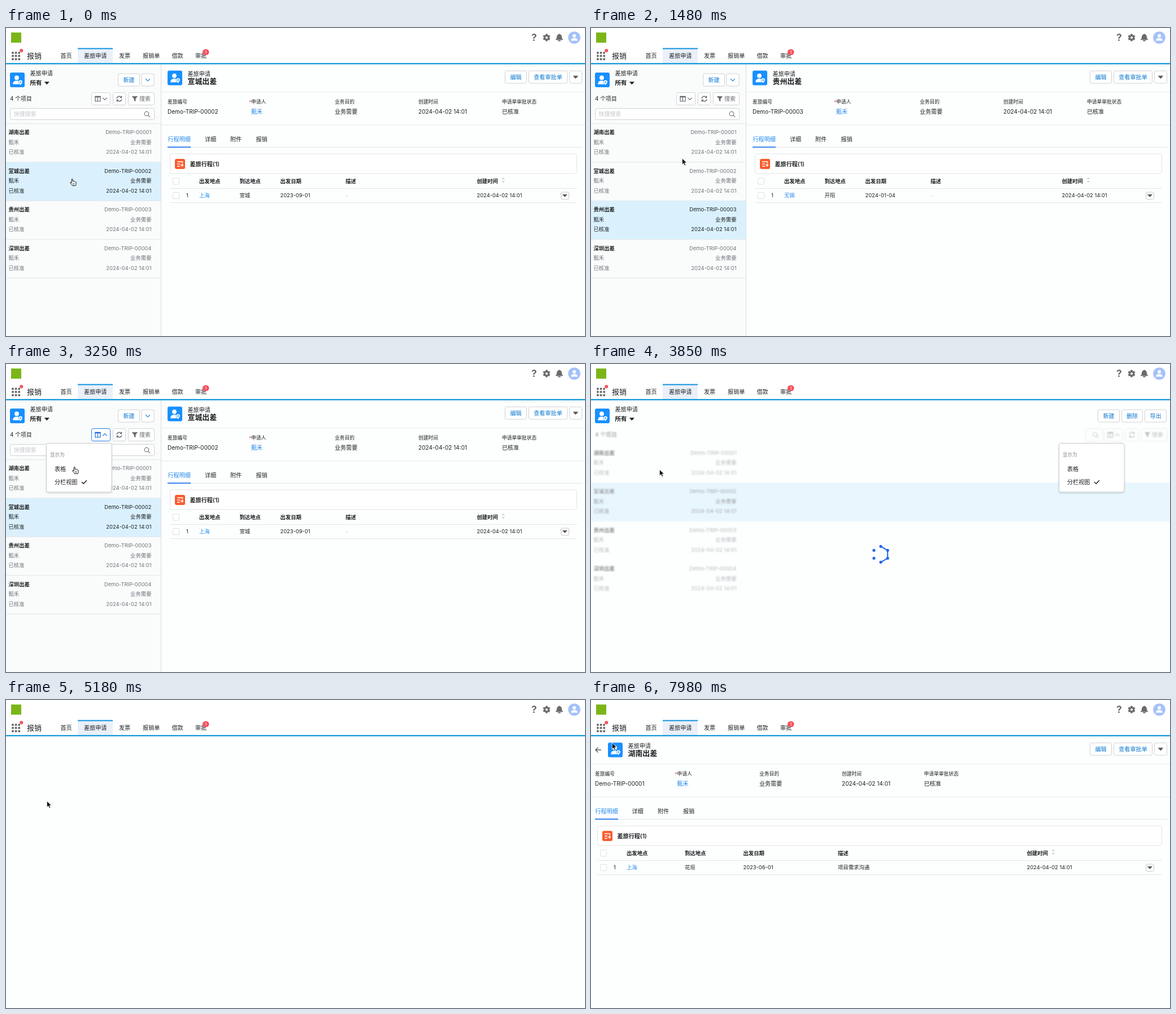
An HTML page for the animation above (8 s loop, 1025x546 px).

```html
<!DOCTYPE html>
<html lang="zh-CN">
<head>
<meta charset="utf-8">
<style>
html, body { margin: 0; width: 100%; height: 100%; overflow: hidden; background: #fdfefe; }
svg { display: block; width: 1025px; height: 546px; }
text { font-family: Inter, "Noto Sans CJK SC", "Noto Sans CJK", sans-serif; white-space: pre; }
</style>
</head>
<body>
<svg viewBox="0 0 1025 546" xmlns="http://www.w3.org/2000/svg">
  <defs>
    <filter id="soft" x="-5%" y="-5%" width="110%" height="110%"><feGaussianBlur stdDeviation="0.9"/></filter>
    <filter id="shade" x="-10%" y="-10%" width="120%" height="125%"><feDropShadow dx="0" dy="1.5" stdDeviation="1.5" flood-opacity=".16"/></filter>
  </defs>
  <g id="stage"></g><g id="top"></g><g id="cursor"></g>
</svg>
<script>
const INK = '#1d1f22', GREY = '#70747b', BLUE = '#0b78d0', LINK = '#2388ee', LINE = '#e3e4e6';
const PERSON = '甄禾', PURPOSE = '业务需要', STAMP = '2024-04-02 14:01', STATE = '已核准';
const TRIPS = [
  ['湖南出差', '上海', '花垣', '2023-06-01', '项目需求沟通'],
  ['宣城出差', '上海', '宣城', '2023-09-01', '-'],
  ['贵州出差', '无锡', '开阳', '2024-01-04', '-'],
  ['深圳出差', '上海', '深圳', '2024-02-01', '-']
].map(([name, from, to, date, note], i) => ({ name, from, to, date, note, no: 'Demo-TRIP-0000' + (i + 1) }));

// y is the optical middle of the text
function text(x, y, s, size = 10, fill = INK, weight = 400, anchor = 'start') {
  return `<text x="${x}" y="${y + size * 0.37}" font-size="${size}" fill="${fill}" font-weight="${weight}" text-anchor="${anchor}">${s}</text>`;
}
const bold = (x, y, s, size, fill) => text(x, y, s, size, fill, 600);
const rect = (x, y, w, h, fill, extra = '') => `<rect x="${x}" y="${y}" width="${w}" height="${h}" fill="${fill}" ${extra}/>`;
const frame = (x, y, w, h, stroke = '#cfd2d6', r = 3) => rect(x + .5, y + .5, w - 1, h - 1, '#fff', `rx="${r}" stroke="${stroke}"`);
const path = (d, stroke, width = 1.2, fill = 'none') =>
  `<path d="${d}" fill="${fill}" stroke="${stroke}" stroke-width="${width}" stroke-linecap="round" stroke-linejoin="round"/>`;
const circle = (x, y, r, fill) => `<circle cx="${x}" cy="${y}" r="${r}" fill="${fill}"/>`;
const hline = (x1, x2, y, c = LINE) => rect(x1, y, x2 - x1, 1, c);
const move = (x, y, s) => `<g transform="translate(${x} ${y})">${s}</g>`;
const chevron = (x, y, c, up = 1) => path(`M${x - 3.5} ${y - 1.7 * up}l3.5 ${3.5 * up} 3.5 ${-3.5 * up}`, c, 1.1);
const triangle = (x, y, w, c) => path(`M${x - w} ${y - w / 2}h${2 * w}l${-w} ${w * 1.1}z`, c, .8, c);
const button = (x, y, w, s) => frame(x, y, w, 23) + text(x + w / 2, y + 11.5, s, 10.1, BLUE, 400, 'middle');
const lens = (x, y, c) => path(`M${x + 2.4} ${y + 2.4}l2.8 2.8M${x + 3.2} ${y - .5}a3.8 3.8 0 1 1-7.6 0a3.8 3.8 0 1 1 7.6 0`, c, 1.1);

function tripIcon(x, y) {
  return move(x, y, rect(0, 0, 26, 26, '#1890ff', 'rx="3"') + circle(12, 9.2, 3.9, '#fff') +
    path('M5.5 20.2q0-5.6 6.5-5.6q2 0 3 .8l-.6 2 1.8 2.8z', '#fff', .6, '#fff') +
    path('M18.6 21.5q-3-3-3-4.8a3 3 0 0 1 6 0q0 1.800-3 4.800z', '#fff', .6, '#fff') + circle(18.6, 16.7, 1.2, '#1890ff'));
}

function layoutButton(x, y, active, up) {
  const c = active ? '#1769d8' : '#60656b';
  return frame(x, y, 34, 23, active ? '#2878e8' : '#cfd2d6') +
    path(`M${x + 7} ${y + 7.500}h9v8.500h-9zM${x + 11.500} ${y + 8}v8`, c, 1.2) +
    rect(x + 6.4, y + 6.6, 10.200, 2.3, c) + chevron(x + 24, y + 11.5, c, up ? -1 : 1);
}

function refreshButton(x, y) {
  return frame(x, y, 23, 23) + move(x + 11.5, y + 11.5,
    path('M-4.300-1a4.400 4.400 0 0 1 8-1.400M4.300 1a4.400 4.400 0 0 1-8 1.400M4.200-4.600v2.400h-2.400M-4.200 4.600v-2.400h2.400', '#60656b', 1.3));
}

function filterButton(x, y) {
  return frame(x, y, 47, 23) + move(x + 12, y + 11.5,
    path('M-4.500-4.200h9l-3.500 4.200v4.200l-2-1.200v-3z', '#666', .8, '#666')) + text(x + 20, y + 11.5, '搜索', 10, '#666b72');
}

function heading() {
  return tripIcon(7, 79) + text(42.5, 80.5, '差旅申请', 10.1) + bold(42.5, 97.5, '所有', 10.500) + triangle(72.5, 97.5, 3.600, INK);
}

const logo = () => rect(9, 8, 18, 18, '#7cb518');

function gear() {
  const teeth = [0, 60, 120].map(a => rect(-1.9, -6.500, 3.8, 13, '#6b6b6b', `rx=".8" transform="rotate(${a})"`)).join('');
  return move(957, 17, teeth + circle(0, 0, 4.8, '#6b6b6b') + circle(0, 0, 2.1, '#fff'));
}

function topBar() {
  let s = rect(0, 0, 1025, 62, '#fff') + logo() + text(935, 17, '?', 17.500, '#6b6b6b', 700, 'middle') + gear();
  s += move(979.500, 17, path('M-6 3.500q2-1.500 2-5a4 4 0 0 1 8 0q0 3.500 2 5z', '#6b6b6b', 1, '#6b6b6b') +
    circle(0, -5.600, 1.200, '#6b6b6b') + path('M-1.500 5.500h3', '#6b6b6b', 1.800));
  s += circle(1006, 17, 10.800, '#a5c1fb') + circle(1006, 13.700, 3, '#fff') + path('M1000.500 22q0-4 5.500-4t5.500 4z', '#fff', .6, '#fff');
  for (let i = 0; i < 9; i++) s += circle(12 + i % 3 * 5.600, 44 + Math.floor(i / 3) * 5.600, 2, '#666');
  s += circle(27.300, 40, 3, '#f5515c') + text(37, 49.500, '报销', 12.900);
  s += rect(127, 35.500, 62, 27, '#e9f0f9') + rect(127, 35.500, 62, 2, '#1296db');
  s += text(96.500, 49.500, '首页', 10.1) + text(138, 49.500, '差旅申请', 10.1, INK, 500);
  [[200, '发票'], [242, '报销单'], [293.500, '借款'], [335, '审批']].forEach(([x, n]) => s += text(x, 49.500, n, 10.1));
  s += rect(348, 37.500, 11.500, 10.500, '#f5515c', 'rx="5.250"') + text(353.700, 42.800, '1', 8, '#fff', 400, 'middle');
  return s + rect(0, 62, 1025, 2.400, '#1a9fdc');
}

function listRows(top, selected, width, lines) {
  return TRIPS.map((trip, i) => {
    const y = top + i * 68.4, on = i === selected, c = on ? INK : GREY;
    const right = (dy, s) => text(257.500, y + dy, s, 9.350, c, 400, 'end');
    return (on ? rect(0, y, width, 68.4, lines ? '#daf1fd' : '#d2eefe') : '') +
      bold(4.500, y + 15.500, trip.name, 9.350) + text(4.500, y + 33, PERSON, 9.350, c) + text(4.500, y + 50.500, STATE, 9.350, c) +
      right(15.500, trip.no) + right(33, PURPOSE) + right(50.500, STAMP) + (lines ? hline(0, 274, y + 67.900) : '');
  }).join('');
}

function listPanel(selected, active, open) {
  return rect(0, 64, 274, 482, '#fafbfb') + heading() + button(198, 80.500, 39, '新建') + frame(239.500, 80.500, 23, 23) +
    chevron(251, 92, BLUE) + text(7, 125.500, '4 个项目', 9.900) + layoutButton(151, 114, active, open) +
    refreshButton(189, 114) + filterButton(216, 114) + frame(7, 142, 256, 21) + text(13.500, 152.500, '快捷搜索', 10, '#c6c8cb') +
    lens(249.500, 152.500, '#666') + hline(0, 274, 169) + listRows(169.500, selected, 274, true) + rect(274, 64, 1, 482, '#dcdddf');
}

const SPLIT = { icon: 286, title: 321.500, cols: [286, 434, 582, 730, 878], tabs: [286.500, 352, 397, 442.500], box: 290,
  num: 319, table: [342, 413.500, 485.500, 601, 833.500] };
const PAGE = { icon: 30, title: 65.500, cols: [7, 152.500, 298, 444, 589.500], tabs: [7.500, 72.500, 118, 163], box: 11,
  num: 40, table: [63, 166, 269.500, 437, 771.500] };

function detail(trip, at, showTable = true) {
  const [left] = at.cols;
  const labels = ['差旅编号', '申请人', '业务目的', '创建时间', '申请单审批状态'];
  const values = [trip.no, PERSON, PURPOSE, STAMP, STATE];
  let s = tripIcon(at.icon, 75.500) + text(at.title, 81.500, '差旅申请', 10.1) + bold(at.title, 94.500, trip.name, 12.900);
  s += button(883, 75.500, 39, '编辑') + button(925, 75.500, 69, '查看审批单') + frame(997, 75.500, 23, 23) + triangle(1008.500, 87, 4, '#555');
  s += hline(left > 20 ? 275 : 0, 1025, 113, '#ebecee') + hline(left > 20 ? 275 : 0, 1025, 171.500, '#e6e7e9');
  labels.forEach((l, i) => s += text(at.cols[i], 131, l, 8.750, INK, 500) + text(at.cols[i], 148.500, values[i], 10.050, i === 1 ? LINK : INK));
  s += text(at.cols[1] - 4, 132, '*', 8.750, '#e5484d');
  ['行程明细', '详细', '附件', '报销'].forEach((l, i) => s += text(at.tabs[i], 197.500, l, 10.1, i ? INK : LINK));
  s += hline(left, 1020, 211) + rect(left, 210.300, 41, 1.800, '#2378f0');
  if (!showTable) return s;
  const b = at.box, check = y => rect(b + 5.500, y - 5.500, 11, 11, '#fff', 'rx="1.500" stroke="#dedfe2"');
  s += frame(b, 222.500, 1011 - b, 36, LINE) + rect(b + 9, 232, 18, 18, '#fb5a2c', 'rx="3"') +
    move(b + 9, 232, path('M4.500 5h9M4.500 9h4M4.500 13h4M10.500 11h4M12.500 9l2 2-2 2M13.500 5v2', '#fff', 1.500)) +
    bold(b + 35.500, 241, '差旅行程(1)', 10.1);
  ['出发地点', '到达地点', '出发日期', '描述', '创建时间'].forEach((l, i) => s += bold(at.table[i], 271.500, l, 9.350));
  const sort = at.table[4] + 47;
  s += triangle(sort, 272.500, 1.800, '#c9cbcf') + path(`M${sort - 1.800} 267.600h3.600l-1.800-2z`, '#c9cbcf', .8, '#c9cbcf');
  s += check(271.500) + hline(b, 1011, 284) + check(297) + text(at.num, 297, '1', 9.350) + hline(b, 1011, 309);
  [trip.from, trip.to, trip.date, trip.note, STAMP].forEach((v, i) =>
    s += text(at.table[i], 297, v, 9.350, i ? (v === '-' ? '#c6c8cb' : INK) : LINK));
  return s + frame(982, 290.500, 15, 13.500, '#c6c8cb', 2) + triangle(989.500, 297, 3.700, '#555');
}

function menu(x) {
  return rect(x + .5, 140.500, 115.500, 86.500, '#fff', 'rx="3" stroke="#c9ccd1" filter="url(#shade)"') +
    text(x + 7, 160.500, '显示为', 8.600, '#85888d') + text(x + 15, 186.500, '表格', 10.1) +
    text(x + 15, 209.500, '分栏视图', 10.1) + path(`M${x + 63.500} 209.500l2.700 2.700 5.300-5.500`, INK, 1.500);
}

function spinner(step) {
  const point = i => [513 + 14 * Math.sin(i * Math.PI / 3), 337.300 - 14 * Math.cos(i * Math.PI / 3)];
  const sides = step % 6, d = Array.from({ length: sides + 1 }, (_, i) => point(i).join(' ')).join('L');
  return path('M' + d, '#2466e8', 2) + [0, 1, 2, 3, 4, 5].map(i => circle(...point(i), 2.600, '#2466e8')).join('');
}

const wideHeading = () => heading() + button(897, 80.500, 39, '新建') + button(939, 80.500, 38, '删除') + button(980, 80.500, 39, '导出');
const wideTools = open => text(7, 125.500, '4 个项目', 9.900) + frame(875, 114, 31, 23) + lens(893, 125.500, '#666') +
  layoutButton(908, 114, false, open) + refreshButton(946, 114) + filterButton(973, 114);

function loading(step, open) {
  return wideHeading() + `<g opacity=".48" filter="url(#soft)">${listRows(142, 1, 1025, false)}${wideTools(open)}</g>` +
    (open ? menu(828) : '') + spinner(step);
}

function table() {
  const cols = [57, 230, 400, 550, 700, 870];
  const check = y => rect(10.500, y - 5.500, 11, 11, '#fff', 'rx="1.500" stroke="#dedfe2"');
  let s = wideHeading() + wideTools(false) + hline(0, 1025, 145) + check(159) + hline(0, 1025, 172);
  ['名称', '差旅编号', '申请人', '业务目的', '创建时间', '申请单审批状态'].forEach((l, i) => s += bold(cols[i], 159, l, 9.350));
  TRIPS.forEach((trip, r) => {
    const y = 185 + r * 26;
    s += check(y) + text(36, y, r + 1, 9.350) + hline(0, 1025, y + 13);
    [trip.name, trip.no, PERSON, PURPOSE, STAMP, STATE].forEach((v, i) =>
      s += text(cols[i], y, v, 9.350, i === 0 || i === 2 ? LINK : INK));
  });
  return s;
}

const split = (row, shown, showTable, active, open) => () => listPanel(row, active, open) +
  detail(TRIPS[shown], SPLIT, showTable) + (open ? menu(71) : '');
const page = showTable => () => path('M17.500 88.500h-9.500M12 84.500l-4 4 4 4', '#555', 1.300) + detail(TRIPS[0], PAGE, showTable);

const SCENES = [
  [0, split(1, 1, true)], [730, split(2, 1, true)], [880, split(2, 2, false)], [1030, split(2, 2, true)],
  [1630, split(1, 2, true)], [1780, split(1, 1, false)], [1930, split(1, 1, true, true)],
  [2370, split(1, 1, true, true, true)], [3850, () => loading(3, true)], [4000, () => loading(4, false)],
  [4150, () => loading(5, false)], [4290, () => loading(0, false)], [4440, table],
  [5040, () => ''], [5480, page(false)], [5780, page(true)]
];

// time, x, y, pointer shape
const POINTER = [
  [0, 113, 267, 'hand'], [150, 114, 276, 'hand'], [290, 120, 310, 'hand'], [440, 123, 326, 'hand'],
  [1030, 130, 300, 'hand'], [1180, 134, 268, 'hand'], [1480, 161, 231, 'arrow'], [1630, 165, 180, 'arrow'],
  [1780, 163, 140, 'arrow'], [1930, 161, 127, 'hand'], [2520, 157, 135, 'hand'], [2670, 146, 152, 'hand'],
  [2810, 133, 168, 'hand'], [2960, 123, 179, 'hand'], [3110, 119, 182, 'hand'], [3250, 117, 182, 'hand'],
  [3850, 121, 187, 'arrow'], [4150, 108, 188, 'arrow'], [4290, 84, 186, 'arrow'], [4440, 69, 181, 'hand'],
  [5040, 72, 179, 'arrow'], [6220, 92, 190, 'arrow'], [6370, 340, 218, 'arrow'], [6510, 957, 168, 'arrow'],
  [6660, 949, 280, 'arrow'], [6810, 930, 420, 'arrow'], [6960, 915, 510, 'arrow'], [7100, 975, 400, 'arrow'],
  [7250, 1003, 312, 'arrow'], [7400, 1002, 96, 'arrow'], [7540, 755, 108, 'arrow'], [7690, 226, 69, 'arrow'],
  [7830, 60, 42, 'arrow'], [7980, 37, 76, 'arrow']
];
const SHAPES = {
  arrow: path('M.3.3v10.900l2.600-2.400 1.900 4.200 2-.9-1.900-4.100h3.500z', '#fff', .8, '#111'),
  hand: path('M3.200 7.300V1.700q0-1.200 1-1.200t1 1.200V5q.2-.8 1.200-.7.900.1.900.9.400-.6 1.200-.4.800.2.800 1 .4-.4 1-.2.700.3.700 1.200v2.400q0 1.600-1 3.300H4.700Q3.900 10.800 1 8.200.200 7.200.900 6.700q.8-.5 2.300.6z', '#111', 1, '#fff') +
    path('M5.800 8.400v2.200M7.600 8.400v2.200', '#111', .7)
};

const [stage, bar, cursor] = ['stage', 'top', 'cursor'].map(id => document.getElementById(id));
const current = (list, t) => list.findLast(item => item[0] <= t);
let shownScene, shownPointer;
bar.innerHTML = topBar();

function draw(t) {
  const scene = current(SCENES, t), pointer = current(POINTER, t);
  if (scene !== shownScene) stage.innerHTML = (shownScene = scene)[1]();
  if (pointer !== shownPointer) {
    shownPointer = pointer;
    const [, x, y, shape] = pointer;
    cursor.innerHTML = move(x, y, SHAPES[shape]);
  }
}

const start = performance.now();
function tick() {
  draw((performance.now() - start) % 8000);
  requestAnimationFrame(tick);
}
tick();
</script>
</body>
</html>
```
